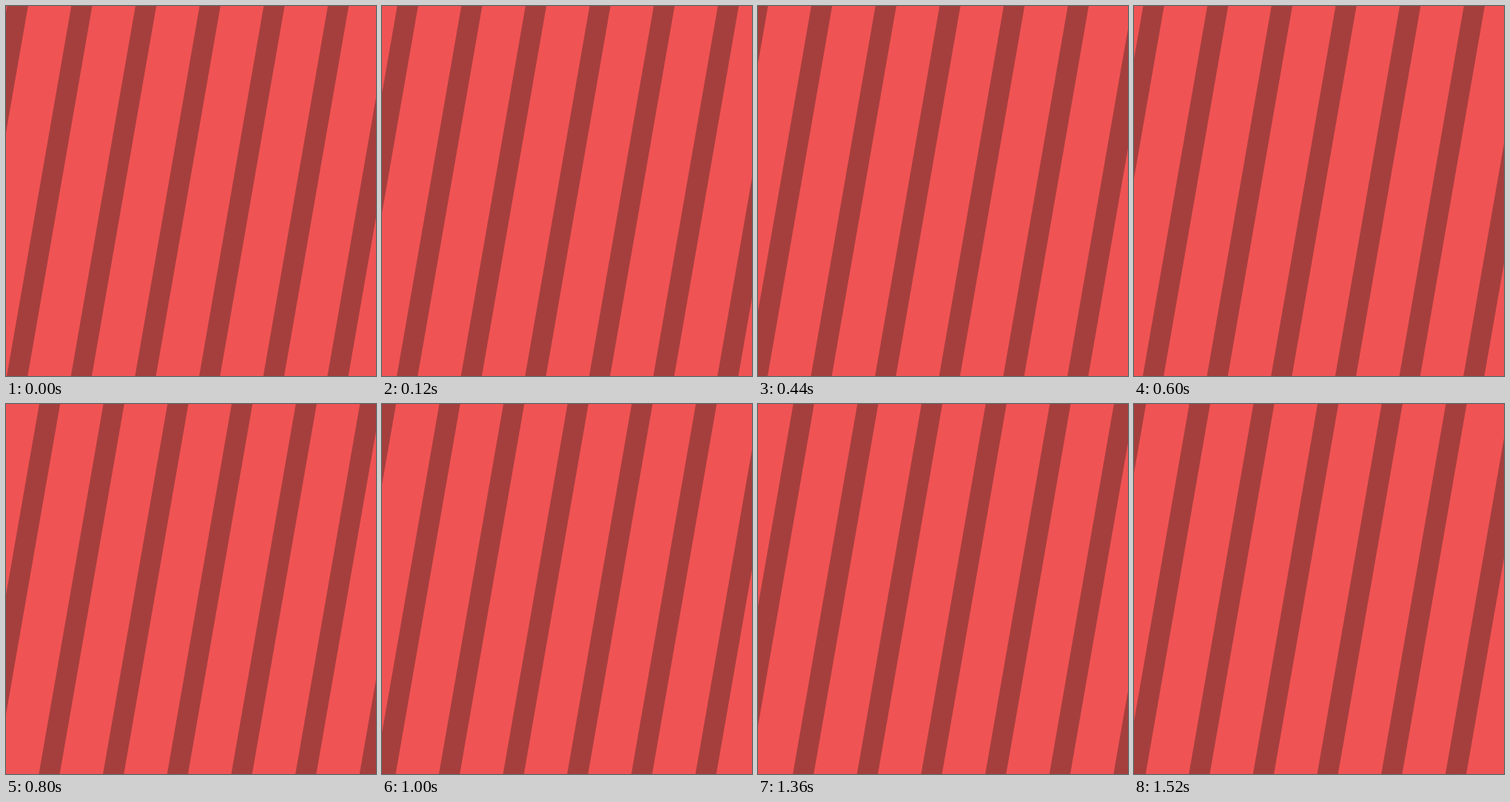
Write an HTML page that moves like this. It is 500 by 500 pixels and loops after 1560 ms.

```html
<!DOCTYPE html>
<html lang="en">
<head>
<meta charset="utf-8">
<title>Sliding stripes</title>
<style>
  html, body { margin: 0; width: 100%; height: 100%; overflow: hidden; background: #f05353; }
  svg { display: block; width: 100vw; height: 100vh; }
</style>
</head>
<body>
<svg viewBox="0 0 500 500" preserveAspectRatio="none">
  <path id="stripes" fill="#a53f3e"/>
</svg>
<script>
  const PITCH = 260 / 3;   // distance between stripes
  const WIDTH = 28.2;
  const LEAN = 87.2;       // sideways shift from top to bottom
  const START = 1.6;
  const LOOP = 1560, HOLD = 40;

  const stripes = document.getElementById('stripes');
  let d = '';
  for (let i = -1; i < 8; i++) {
    const x = START + i * PITCH;
    d += `M${x} 0h${WIDTH}l${-LEAN} 500h${-WIDTH}z`;
  }
  stripes.setAttribute('d', d);

  // Pictures hold for 40 ms; positions fall on a 60 Hz grid, 32 ticks per pitch.
  function draw(now) {
    const step = Math.floor((now % LOOP) / HOLD);
    const tick = Math.floor(step * 12 / 5);
    stripes.setAttribute('transform', `translate(${(tick % 32) * PITCH / 32} 0)`);
  }

  let t0;
  function loop(now) {
    t0 ??= now;
    draw(Math.max(0, now - t0));
    requestAnimationFrame(loop);
  }
  draw(0);
  requestAnimationFrame(loop);
</script>
</body>
</html>
```
